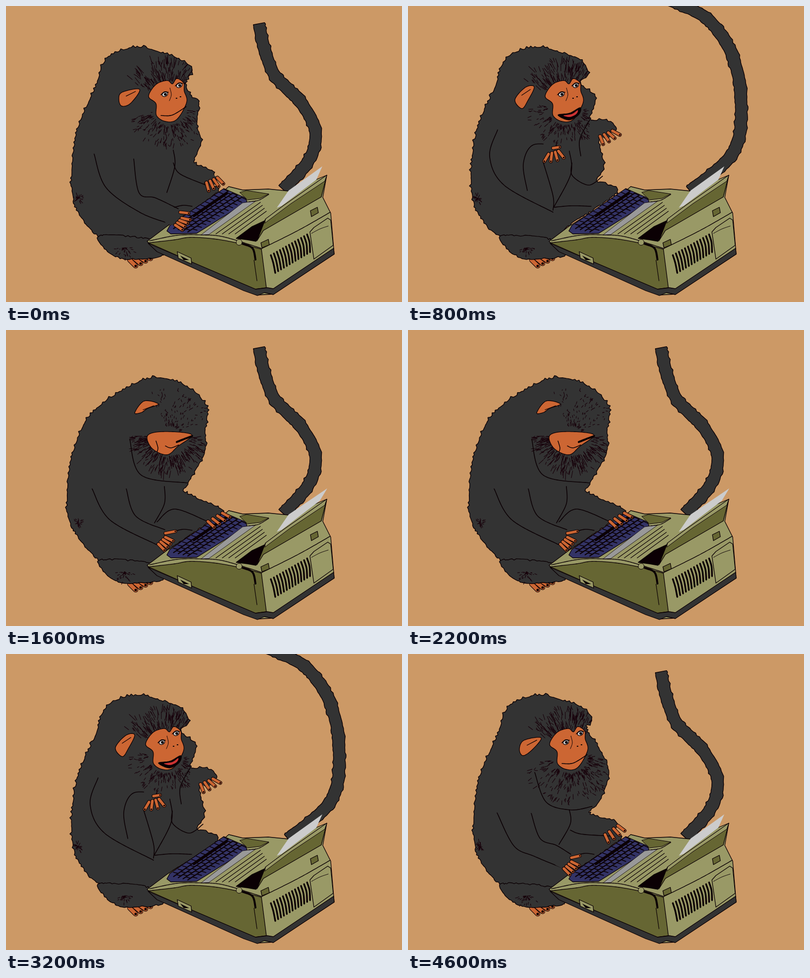
Recreate the animation shown at these times as an HTML page with a canvas. Size 800 px wide and 600 px high, loop 4.8 s.

```html
<!DOCTYPE html>
<html lang="en">
<head>
<meta charset="utf-8">
<title>Typing monkey</title>
<style>
html, body { margin: 0; width: 100%; height: 100%; overflow: hidden; background: #c96; }
canvas { display: block; width: 800px; height: 600px; }
</style>
</head>
<body>
<canvas id="stage" width="800" height="600"></canvas>
<script>
const ctx = document.getElementById('stage').getContext('2d');
const FUR = '#333333', SKIN = '#cc6633', LIGHT = '#999966', DARK = '#666633';
const BLUE = '#333366', PALE = '#cccccc', INK = '#0b0004', HAIR = '#17000a';
const STEP = 200, LOOP = 4800;

// One letter per step: pose, tail up or down, paper short or long.
const ACTS = 'ABSDhCDEDEEDBAHCHBHSGggS';
const TAILS = 'dddduddddddduuuuuuuuuudd';
const PAPER = 'sssLssLLLLLLLLsssLsLLLLs';

let seed = 1;
function rnd() {
  seed = (seed * 16807) % 2147483647;
  return seed / 2147483647;
}
const pts = s => s.split(' ').map(p => p.split(',').map(Number));
const lerp = (a, b, t) => a + (b - a) * t;
const mix = (p, q, t) => [lerp(p[0], q[0], t), lerp(p[1], q[1], t)];
const polar = (x, y, r, a) => [x + r * Math.cos(a), y + r * Math.sin(a)];

// Points about `gap` pixels apart on a spline through the key points.
function spline(s, closed, gap = 3) {
  const list = pts(s), n = list.length, out = [];
  const at = i => closed ? list[(i + n) % n] : list[Math.max(0, Math.min(n - 1, i))];
  for (let i = 0; i < (closed ? n : n - 1); i++) {
    const a = at(i - 1), b = at(i), c = at(i + 1), d = at(i + 2);
    const steps = Math.max(2, Math.round(Math.hypot(c[0] - b[0], c[1] - b[1]) / gap));
    for (let k = 0; k < steps; k++) {
      const t = k / steps;
      out.push([0, 1].map(j => b[j] + t / 2 * (c[j] - a[j]
        + t * (2 * a[j] - 5 * b[j] + 4 * c[j] - d[j] + t * (3 * (b[j] - c[j]) + d[j] - a[j])))));
    }
  }
  if (!closed) out.push(at(n - 1));
  return out;
}

function trace(list, closed) {
  ctx.beginPath();
  list.forEach(p => ctx.lineTo(...p));
  if (closed) ctx.closePath();
}
function stroke(width, color = INK) {
  ctx.lineWidth = width;
  ctx.strokeStyle = color;
  ctx.stroke();
}
function fill(list, color, width = 1.3) {
  trace(list, true);
  ctx.fillStyle = color;
  ctx.fill();
  if (width) stroke(width);
}
const poly = (s, color, width) => fill(pts(s), color, width);
const blob = (s, color, width) => fill(spline(s, true), color, width);
function line(s, width = 1.4) {
  trace(spline(s));
  stroke(width);
}
function bar(p, q, width, color) {
  trace([p, q]);
  stroke(width, color);
}

// Pushes outline points in and out at random, like tufts.
function furry(list, amp) {
  fill(list.map((p, i) => {
    const q = list[(i + 1) % list.length], len = Math.hypot(q[0] - p[0], q[1] - p[1]) || 1;
    const r = rnd() ** 3 * amp;
    return [p[0] + (q[1] - p[1]) / len * r, p[1] - (q[0] - p[0]) / len * r];
  }), FUR, 1.4);
}

// Hairs that radiate from a centre, dense near the inner radius.
function ruff(x, y, [from, to, inner, outer, count, length]) {
  for (let i = 0; i < count; i++) {
    const a = lerp(from, to, rnd()), r = lerp(inner, outer, rnd() ** 1.5);
    bar(polar(x, y, r, a), polar(x, y, r + length * (0.3 + rnd()), a + 0.08 * (rnd() - 0.5)), 1.1, HAIR);
  }
}

function finger(p, q, width) {
  bar(p, q, width + 2.2, INK);
  bar(p, q, width, SKIN);
  ctx.beginPath();
  ctx.arc(...q, width * 0.32, 0, 7);
  ctx.fillStyle = INK;
  ctx.fill();
}

// Four fingers fan out between two knuckles, turning from one angle to the other.
function hand({ knuckles, fan, thumb }, shift) {
  ctx.save();
  ctx.translate(...shift);
  const [p, q] = pts(knuckles), mid = mix(p, q, 0.5), turn = (fan[0] + fan[1]) / 2;
  bar(mid, polar(...mid, -20, turn * 0.7), 21, FUR);
  if (thumb) finger(...pts(thumb), 5);
  for (let i = 0; i < 4; i++) {
    const base = mix(p, q, i / 3);
    finger(base, polar(...base, 17, lerp(...fan, i / 3)), 5.4);
  }
  ctx.restore();
}

const BACK = '192,466 150,423 134,375 136,300 150,235 180,168 205,106 265,84 320,97 355,111 ';
const KNEE = ' 427,376 326,446 288,477';
const BROW = [-2.55, -0.95, 52, 95, 130, 14];

const sad = {
  body: BACK + '376,130 362,153 373,183 389,193 385,240 394,275 380,318 420,337 400,361' + KNEE,
  ear: '228,190 234,175 270,169 252,197 234,203',
  at: 0, ruffs: [BROW, [0.1, 2.9, 36, 80, 190, 8]],
  lines: ['178,300 202,368 270,418 330,441', '258,310 269,379 302,389 348,411', '338,292 341,325 325,378', '338,318 351,340 401,362', '340,408 358,404 376,406'],
  left: { knuckles: '355,430 342,444', fan: [0.2, 0.6], thumb: '352,418 369,420' },
  right: { knuckles: '405,358 427,348', fan: [1.3, 0.8] }
};
const stern = {
  body: BACK + '371,135 358,150 385,190 405,240 388,295 366,324 420,340 415,363' + KNEE,
  ear: '225,193 234,175 269,170 250,195 232,206',
  at: -2, ruffs: [BROW, [0, 2.9, 36, 95, 260, 8]],
  lines: ['180,322 214,389 255,410 310,433', '249,323 267,374 300,388 329,406', '256,240 279,300 328,316 372,309', '326,316 328,344 305,386', '328,357 350,365 408,369', '340,408 358,404 376,406'],
  left: { knuckles: '330,421 315,435', fan: [0.45, 0.8], thumb: '330,413 347,409' },
  right: { knuckles: '398,366 424,348', fan: [1.15, 0.65] }
};
const happy = {
  body: BACK + '369,138 352,156 383,187 372,229 405,232 426,250 390,264 400,325 386,356' + KNEE,
  ear: '221,190 242,165 260,164 247,192 235,208',
  at: -6, smile: true, ruffs: [BROW, [0.1, 3.2, 36, 75, 180, 7]],
  lines: ['186,251 170,305 199,363 298,418', '246,374 238,320 257,282 305,283', '278,316 298,385 298,414', '331,294 334,340 300,407', '354,304 352,270 372,231', '336,318 337,344 370,363 398,345', '300,408 335,405 375,406'],
  left: { knuckles: '289,300 309,294', fan: [2.1, 0.9], thumb: '298,288 311,286' },
  right: { knuckles: '393,264 418,253', fan: [1.2, 0.5] }
};
const down = {
  body: '192,466 135,400 124,350 132,265 165,180 230,126 300,97 365,115 404,155 402,202 400,250 366,312 362,330 432,362' + KNEE,
  ear: '260,168 279,144 308,150 286,159 274,167',
  ruffs: [[-2, -0.4, 20, 95, 130, 4], [0, 3.2, 40, 75, 240, 12]],
  lines: ['174,322 210,385 304,435', '243,322 262,377 321,405', '250,222 273,294 366,310', '320,317 320,352 300,391', '305,389 340,363 405,387', '340,408 358,404 376,406'],
  left: { knuckles: '322,420 308,434', fan: [0.45, 0.8], thumb: '322,412 342,408' },
  right: { knuckles: '408,388 437,371', fan: [0.75, 0.5] }
};

const STILL = [0, 0];
const MOVES = {
  A: { pose: sad },
  B: { pose: sad, lean: 0.008, left: [-4, 3], right: [7, 2] },
  C: { pose: sad, lean: -0.008, left: [-2, 9] },
  S: { pose: stern },
  G: { pose: stern, lean: -0.035 },
  g: { pose: stern, lean: -0.035, glance: -2 },
  D: { pose: down },
  E: { pose: down, lean: 0.006, left: [6, 7], right: [19, -2] },
  H: { pose: happy },
  h: { pose: happy, shift: -5 }
};

function eye(x, y, glance) {
  ctx.beginPath();
  ctx.ellipse(x, y, 6, 4.2, -0.4, 0, 7);
  ctx.fillStyle = PALE;
  ctx.fill();
  stroke(1.2);
  ctx.beginPath();
  ctx.arc(x + glance, y, 2.8, 0, 7);
  ctx.fillStyle = INK;
  ctx.fill();
  line(`${x - 8},${y + 1} ${x - 1},${y - 5} ${x + 7},${y - 4}`, 1.6);
}

function face({ at, smile }, glance) {
  ctx.save();
  ctx.translate(at, 0);
  blob('288,183 303,159 326,151 336,158 345,147 359,156 360,172 365,195 345,230 322,234 304,222 303,198', SKIN);
  eye(321, 179, glance);
  eye(350, 161, glance);
  line('331,166 334,180 330,192', 1);
  ctx.fillStyle = INK;
  [0, 1].forEach(i => ctx.fillRect(343 + 8 * i, 186 - 3 * i, 3, 2));
  if (smile) {
    blob('314,221 338,217 359,206 356,220 336,231', INK);
    blob('325,222 342,219 354,211 351,219 338,225', '#cc3333', 0);
  } else line('313,222 336,221 364,204', 1.6);
  ctx.restore();
}

function bowedFace() {
  blob('286,214 318,206 375,212 347,236 325,253 295,240', SKIN);
  line('303,225 307,239 305,247', 1.5);
  line('322,235 333,239 349,233', 1.5);
  line('345,227 360,221 376,215', 4);
}

function monkey({ pose, lean = 0, shift = 0, glance = 1 }) {
  ctx.save();
  ctx.translate(150 + shift, 330);
  ctx.rotate(lean);
  ctx.translate(-150, -330);
  const skin = spline(pose.body, true, 4);
  furry(skin, 5);
  ctx.save();
  trace(skin, true);
  ctx.clip();
  pose.ruffs.forEach(r => ruff(330 + (pose.at || 0), pose === down ? 215 : 205, r));
  ruff(146, 390, [0, 6.3, 0, 9, 25, 6]);
  ctx.restore();
  pose.lines.forEach(s => line(s, 1.6));
  blob(pose.ear, SKIN);
  const [a, , b] = pts(pose.ear);
  bar(mix(a, b, 0.35), mix(a, b, 0.8), 1.2, INK);
  if (pose === down) bowedFace();
  else face(pose, glance);
  ctx.restore();
}

function leg() {
  for (let i = 0; i < 4; i++) finger([250 + 10 * i, 515 - 3 * i], [262 + 10 * i, 527 - 5 * i], 8);
  furry(spline('192,464 192,484 215,505 245,514 318,506 290,472', true, 4), 3);
  ruff(240, 490, [0, 3.1, 0, 22, 40, 4]);
}

function tail(up) {
  const mid = spline(up
    ? '528,-12 575,8 615,36 655,100 673,190 658,295 570,375'
    : '511,36 522,85 544,142 596,196 625,255 612,312 560,372', false, 5);
  const side = w => mid.map((p, i) => {
    const a = mid[Math.max(0, i - 1)], b = mid[Math.min(mid.length - 1, i + 1)];
    return polar(...p, w, Math.atan2(b[1] - a[1], b[0] - a[0]) + Math.PI / 2);
  });
  furry([...side(-11.5), ...side(11.5).reverse()], 3);
}

function keyboard() {
  poly('325,456 331,445 440,370 484,389 487,397 385,461 333,462', BLUE);
  const at = (u, v) => mix(mix([329, 449], [440, 371], u), mix([377, 460], [485, 392], u), v);
  const rows = 5, cols = 12;
  for (let r = 0; r < rows; r++) {
    if (r) bar(at(0, r / rows), at(1, r / rows), 2.2, INK);
    for (let c = 1; c <= cols; c++) {
      const u = (c - r % 2 * 0.4) / cols;
      bar(at(u, r / rows), at(u, (r + 1) / rows), 1.7, INK);
    }
  }
  bar(at(0.35, 0.25), at(0.95, 0.25), 5, INK);
}

function machine(longPaper) {
  poly('285,477 326,446 443,372 450,366 478,373 530,371 570,375 648,343 640,388 656,420 663,503 540,584 506,586 305,497', LIGHT);
  fill(spline('288,480 340,474 372,469 420,472 470,481 516,493').concat(pts('526,571 504,574 380,521')), DARK);
  poly('287,481 380,521 504,574 528,571 540,573 662,491 663,503 540,585 522,581 508,587 480,577 305,498', FUR);
  line('290,476 345,465 395,464 440,468 515,491');
  line('478,482 498,491 504,514', 4);
  line('501,515 507,557', 1.2);
  line('516,492 590,455 655,418');
  keyboard();
  poly('472,378 486,374 531,381 513,390 488,393', DARK, 1);
  poly('394,464 478,399 505,395 410,463', '#999999', 0.8);
  for (let i = 0; i < 4; i++) {
    const x = 424 + 13 * i;
    bar([x, 462], [x + 90 - 9 * i, 398 + 6 * i], 1.2, INK);
  }
  line('490,397 510,394 531,382', 1.2);
  poly('465,471 497,447 525,434 519,452 505,477 488,474', INK);
  const tip = longPaper ? '649,321 634,346' : '639,325 627,352';
  poly(`547,409 571,374 ${tip} 557,405`, PALE, 0);
  poly('524,432 560,405 648,343 637,387 575,423 520,455 507,476', DARK);
  poly('524,432 560,405 648,343 644,355 575,401 523,440', LIGHT, 1);
  poly('615,415 629,408 631,419 617,427', DARK);
  poly('515,480 530,473 532,484 517,490', DARK);
  poly('614,458 622,449 650,430 656,434 661,485 622,513', LIGHT);
  line('617,461 634,452 651,446', 1);
  for (let i = 0; i < 13; i++) {
    const x = 535 + 6.1 * i, y = 505 - 3.5 * i;
    line(`${x},${y} ${x + 5},${y + 16} ${x + 9 - i * 0.25},${y + 36}`, 3.4);
  }
  poly('346,498 374,511 375,523 348,511', LIGHT);
  poly('352,506 370,515 359,515', INK, 0);
  ctx.beginPath();
  ctx.arc(471, 479, 6, 0, 7);
  ctx.fillStyle = LIGHT;
  ctx.fill();
  stroke(1);
}

function draw(i) {
  const move = MOVES[ACTS[i]], { pose, shift = 0, left = STILL, right = STILL } = move;
  seed = 4271;
  ctx.lineJoin = ctx.lineCap = 'round';
  ctx.fillStyle = '#cc9966';
  ctx.fillRect(0, 0, 800, 600);
  tail(TAILS[i] === 'u');
  monkey(move);
  leg();
  machine(PAPER[i] === 'L');
  hand(pose.left, [left[0] + shift, left[1]]);
  hand(pose.right, [right[0] + shift, right[1]]);
}

let shown = -1;
function tick() {
  const i = Math.floor(performance.now() % LOOP / STEP);
  if (i !== shown) draw(shown = i);
  requestAnimationFrame(tick);
}
tick();
</script>
</body>
</html>
```
